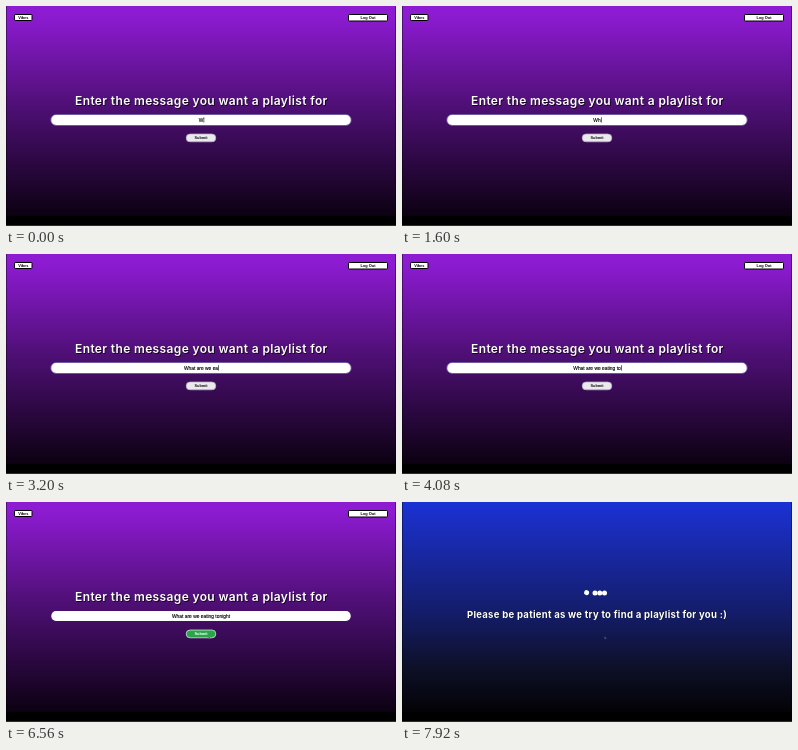
An HTML page for the animation above (8 s loop, 390 by 220 pixels).

```html
<!DOCTYPE html>
<html lang="en">
<head>
<meta charset="utf-8">
<title>Playlist finder</title>
<style>
  html, body { margin: 0; width: 100%; height: 100%; overflow: hidden; background: #000; }
  svg { display: block; width: 100vw; height: 100vh; }
  text { text-anchor: middle; }
  .ui { font: 4.88px "Liberation Sans", Arial, sans-serif; }
  .small { font: bold 3.9px "Liberation Sans", Arial, sans-serif; }
  .title { font-family: Inter, sans-serif; fill: #fff; }
  .ask { font-size: 12px; font-weight: 600; letter-spacing: .36px; }
  .wait { font-size: 9.6px; font-weight: 700; letter-spacing: .24px; }
  .shade { fill: #000; opacity: .75; }
</style>
</head>
<body>
<svg viewBox="0 0 390 220">
  <defs>
    <linearGradient id="purple" x2="0" y2="1">
      <stop offset=".04" stop-color="#8d1bd2"/>
      <stop offset=".5" stop-color="#480e6c"/>
      <stop offset=".95" stop-color="#0c0112"/>
    </linearGradient>
    <linearGradient id="blue" x2="0" y2="1">
      <stop offset=".01" stop-color="#1b31d2"/>
      <stop offset=".5" stop-color="#141d6a"/>
      <stop offset=".75" stop-color="#0e1029"/>
      <stop offset=".95" stop-color="#030306"/>
    </linearGradient>
  </defs>

  <g id="form">
    <rect width="390" height="220" fill="url(#purple)"/>
    <g fill="#fff" stroke="#000" stroke-width="1">
      <rect x="8.5" y="8.5" width="17.5" height="6" rx=".8"/>
      <rect x="342.5" y="8.5" width="39" height="6.5" rx=".8"/>
    </g>
    <text class="small" x="17.3" y="13">Vibes</text>
    <text class="small" x="362" y="13.3">Log Out</text>
    <text class="title ask shade" x="196.2" y="100.3">Enter the message you want a playlist for</text>
    <text class="title ask" x="195.4" y="99.4">Enter the message you want a playlist for</text>
    <rect id="ring" x="45" y="108.8" width="300" height="10.4" rx="4.8" fill="none" stroke="#8f96cc" stroke-width=".8"/>
    <rect x="45.3" y="109.1" width="299.4" height="9.8" rx="4.6" fill="#fff"/>
    <text id="typed" class="ui" x="195" y="115.6" stroke="#000" stroke-width=".12" xml:space="preserve"></text>
    <rect id="caret" y="111.2" width=".6" height="5.4"/>
    <rect id="button" x="180.2" y="128" width="29.6" height="7.8" rx="3.9" stroke-width=".7"/>
    <text id="label" class="small" x="195" y="133.2">Submit</text>
  </g>

  <g id="loading">
    <rect width="390" height="220" fill="url(#blue)"/>
    <g id="dots" fill="#fff"></g>
    <text class="title wait shade" x="195.6" y="116.4">Please be patient as we try to find a playlist for you :)</text>
    <text class="title wait" x="195" y="115.8">Please be patient as we try to find a playlist for you :)</text>
  </g>

  <rect y="210" width="390" height="10"/>
  <path d="M.5 0V220M389.5 0V220" stroke="#000" opacity=".4"/>
  <rect y="219" width="390" height="1" fill="#2c2c2c"/>
  <path id="mouse" d="M0 0V2L.5 1.6L.9 2.3L1.2 2.1L.9 1.4H1.5Z" fill="#111" stroke="#ddd" stroke-width=".2"/>
</svg>

<script>
const $ = id => document.getElementById(id);
const LOOP = 8000;
const MESSAGE = "What are we eating tonight";
const TYPE_START = 1560, KEY_MS = 130;
const TYPE_END = TYPE_START + (MESSAGE.length - 2) * KEY_MS;
const MOVE_START = 5400, MOVE_END = 6260, HOVER = 6140, BLUR = 6480, SUBMIT = 6720;
const SWING_MS = 1400, SWING_ZERO = 7881;
const PITCH = 4.75, ARM = 16.6, DOT_Y = 91;

const clamp = v => Math.min(1, Math.max(0, v));
const show = (el, on) => el.setAttribute("visibility", on ? "inherit" : "hidden");
const set = (el, attrs) => { for (const k in attrs) el.setAttribute(k, attrs[k]); };

const dots = [0, 1, 2, 3].map(i => {
  const dot = document.createElementNS("http://www.w3.org/2000/svg", "circle");
  set(dot, { cx: 195.4 + (i - 1.5) * PITCH, cy: DOT_Y, r: 2.5 });
  return $("dots").appendChild(dot);
});

// CSS ease-out: cubic-bezier(0, 0, .58, 1)
function easeOut(x) {
  let lo = 0, hi = 1;
  for (let i = 0; i < 20; i++) {
    const s = (lo + hi) / 2;
    if (1.74 * s * s * (1 - s) + s ** 3 < x) lo = s; else hi = s;
  }
  return 3 * lo * lo - 2 * lo ** 3;
}

// Each end dot swings out and back during its own half of the cycle.
function swing(dot, phase, side) {
  const p = phase * 4;
  const angle = p < 2 ? 70 * easeOut(1 - Math.abs(p - 1)) : 0;
  const pivot = `${dot.getAttribute("cx")} ${DOT_Y - ARM}`;
  dot.setAttribute("transform", `rotate(${side * angle} ${pivot})`);
}

function drawForm(t) {
  const keys = t < TYPE_START ? 1 : 2 + Math.floor((t - TYPE_START) / KEY_MS);
  const typed = $("typed");
  const text = MESSAGE.slice(0, keys);
  if (typed.textContent !== text) typed.textContent = text;
  set($("caret"), { x: 195.3 + typed.getComputedTextLength() / 2 });

  const focused = t < BLUR;
  const typing = t > TYPE_START && t < TYPE_END;
  const blinkOn = t < TYPE_START ? t % 1000 < 500 || t > 800 : (t - TYPE_END) % 1000 < 500;
  show($("caret"), focused && (typing || blinkOn));
  show($("ring"), focused);

  const hover = t >= HOVER;
  set($("button"), { fill: hover ? "#28a548" : "#ebe8ee", stroke: hover ? "#e9f5ec" : "#b9aec4" });
  set($("label"), { fill: hover ? "#fff" : "#111" });
}

function draw(t) {
  const waiting = t >= SUBMIT;
  show($("form"), !waiting);
  show($("loading"), waiting);

  if (waiting) {
    const phase = ((t - SWING_ZERO) / SWING_MS + 2) % 1;
    swing(dots[0], phase, 1);
    swing(dots[3], (phase + .5) % 1, -1);
  } else {
    drawForm(t);
  }

  const m = clamp((t - MOVE_START) / (MOVE_END - MOVE_START));
  const k = m * m * (3 - 2 * m);
  show($("mouse"), t >= MOVE_START);
  set($("mouse"), { transform: `translate(${209 - 6.3 * k} ${114 + 20.6 * k})` });
}

function tick() {
  draw(performance.now() % LOOP);
  requestAnimationFrame(tick);
}
tick();
</script>
</body>
</html>
```
